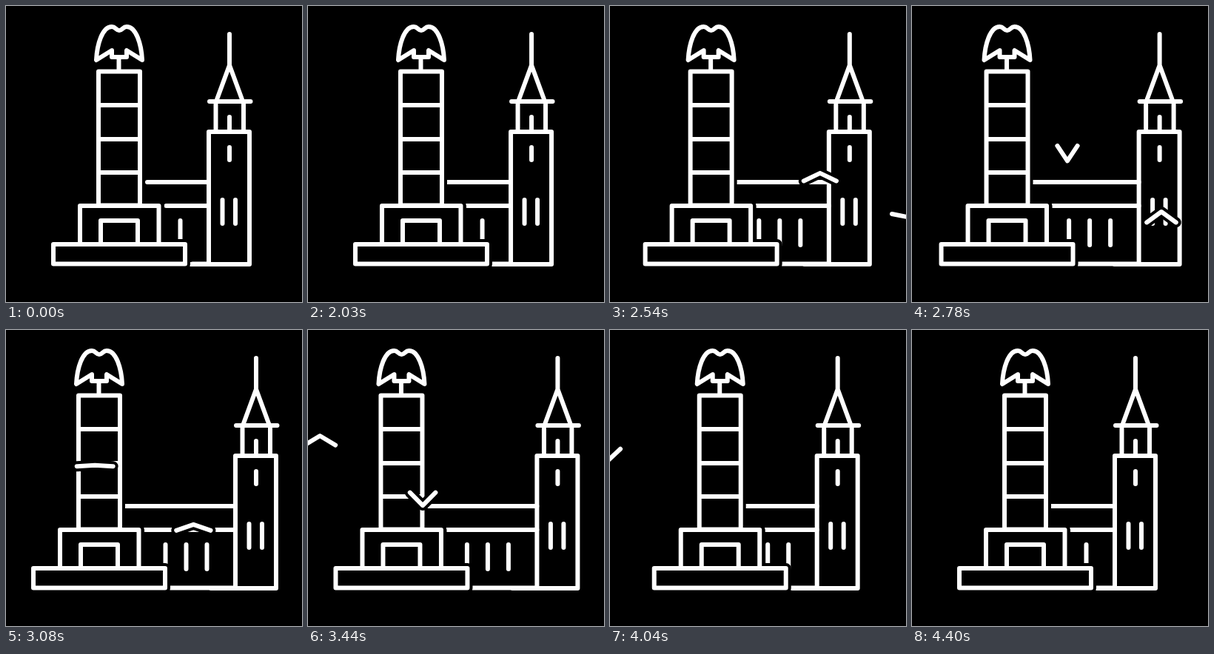
These frames come from a looping animation (400x400 px, 4.43 s). An HTML page:

```html
<!DOCTYPE html>
<html lang="en">
<head>
<meta charset="utf-8">
<title>Column and tower</title>
<style>
  html, body { margin: 0; width: 100%; height: 100%; overflow: hidden; background: #000; }
  svg { display: block; width: 100%; height: 100%; }
  path { fill: none; stroke: #fff; stroke-width: 6; stroke-linecap: round; stroke-linejoin: round; }
  .gap { stroke: #000; stroke-width: 14; }
  .solid { fill: #000; }
</style>
</head>
<body>
<svg viewBox="0 0 400 400">
  <rect width="400" height="400" fill="#000"/>
  <g id="windows">
    <path d="M179.5 290V323M207.5 290V323M235.5 290V323"/>
  </g>
  <path id="nave"/>
  <g id="tower">
    <path d="M274 170H329V349H241M274 170V349"/>
    <path d="M283.5 129V170M321 129V170M275 129H330.5"/>
    <path d="M284 129L302 80L320 129M302 38V80"/>
    <path d="M302 150V168M302 191V208M292.5 262V294M310 262V294"/>
  </g>
  <g id="column">
    <path class="gap solid" d="M125 88H181V270H207V322H242V349H64V322H100V270H125Z"/>
    <path d="M122 73C123 52 130 28 143 28C148 28 149 33 153 33C157 33 158 28 163 28C176 28 183 52 184 73L163 60V69H143V60Z"/>
    <path d="M152.5 70V87"/>
    <path d="M125 88.5H181V269.5H125ZM125 134H181M125 180H181M125 225H181"/>
    <path d="M100 321V270H206.5V321M128 320V290H178V320"/>
    <path d="M64 322H242V348.5H64Z"/>
  </g>
  <g id="birds"></g>
</svg>
<script>
const LOOP = 4430, START = 2030, STEP = 30, WING = 24.5;
const $ = id => document.getElementById(id);
const turn = (dt, period, phase) => (phase / 360 + dt / period) * 2 * Math.PI;

// cubic-bezier easing with control points (.45, 0) and (.42, 1)
function ease(u) {
  if (u <= 0) return 0;
  if (u >= 1) return 1;
  let lo = 0, hi = 1, s = 0.5;
  for (let i = 0; i < 24; i++) {
    s = (lo + hi) / 2;
    const r = 1 - s;
    const x = 3 * r * r * s * 0.45 + 3 * r * s * s * 0.42 + s * s * s;
    if (x < u) lo = s; else hi = s;
  }
  return s * s * (3 - 2 * s);
}

// x position, path height and wing angle in degrees; dt is counted from mid-flight
const birds = [
  {
    x: dt => 210 - 0.304 * dt + 1.55e-5 * dt * dt,
    base: 136,
    angle: dt => -10 + 47 * Math.cos(turn(dt, 410, 170))
  },
  {
    x: dt => 337 - 0.2814 * dt + 0.87e-5 * dt * dt,
    base: 179.2,
    angle: dt => {
      const a = turn(dt, 283, 27);
      return -5 + 46 * Math.cos(a) - 7.5 * Math.sin(a) + 6 * Math.cos(2 * a);
    }
  }
];

for (const bird of birds) {
  bird.paths = ["gap", ""].map(name => {
    const p = document.createElementNS("http://www.w3.org/2000/svg", "path");
    p.setAttribute("class", name);
    return $("birds").appendChild(p);
  });
}

function drawBird(bird, t) {
  const dt = t - 2780;
  const x = bird.x(dt);
  const y = bird.base + 0.4415 * x - 0.00044 * x * x;
  const a = bird.angle(dt) * Math.PI / 180;
  const w = WING * Math.cos(a), h = WING * Math.sin(a);
  const d = `M${x - w} ${y + h}L${x} ${y}L${x + w} ${y + h}`;
  bird.paths.forEach(p => p.setAttribute("d", d));
}

function draw(time) {
  let t = time % LOOP;
  const moving = t >= START;
  t = moving ? START + Math.floor((t - START) / STEP) * STEP : 0;

  const open = ease((t - 2000) / 1070) - ease((t - 3340) / 1060);
  const left = -27 * open, right = 36 * open;
  $("column").setAttribute("transform", `translate(${left} 0)`);
  for (const id of ["tower", "windows"])
    $(id).setAttribute("transform", `translate(${right} 0)`);

  // round line ends show at rest, then slip behind the column
  const tuck = moving ? 6 : 0;
  const line = (x, y) => `M${x + left - tuck} ${y}H${274 + right}`;
  $("nave").setAttribute("d", line(191, 238) + line(216.5, 270) + line(252, 348.5));

  $("birds").setAttribute("visibility", moving ? "visible" : "hidden");
  if (moving) birds.forEach(b => drawBird(b, t));
}

const t0 = performance.now();
function tick() {
  draw(performance.now() - t0);
  requestAnimationFrame(tick);
}
tick();
</script>
</body>
</html>
```
